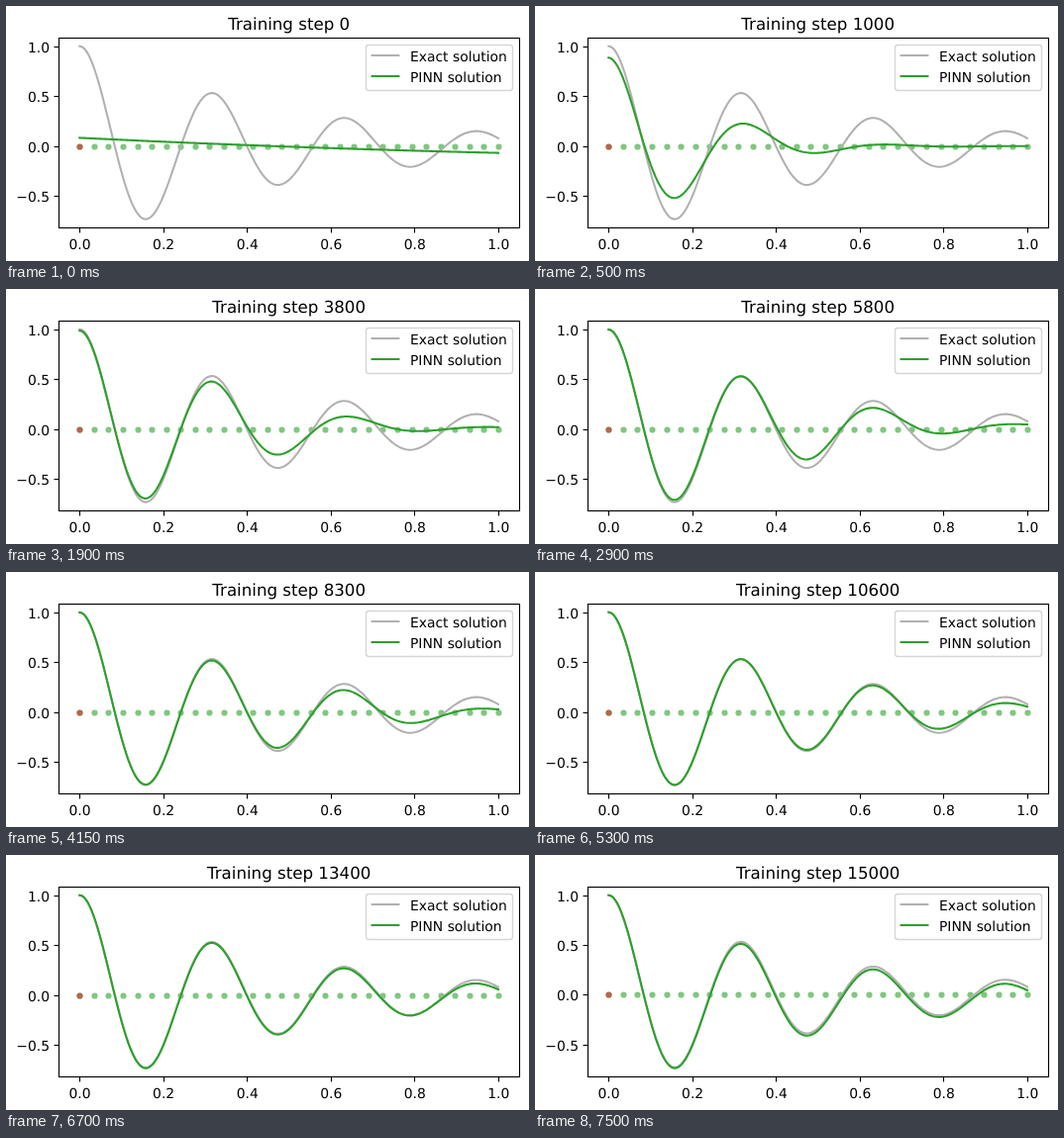
An HTML page for the animation above (7550 ms loop, 528x258 px).

```html
<!DOCTYPE html>
<html lang="en">
<head>
<meta charset="utf-8">
<title>Training curve</title>
<style>
  html, body { margin: 0; width: 100%; height: 100%; overflow: hidden; background: #fff; }
  svg { display: block; width: 528px; height: 258px; }
  text { font: 13.89px "DejaVu Sans", sans-serif; fill: #000; text-rendering: geometricPrecision; }
  #title { font-size: 16.67px; }
  .curve { fill: none; stroke-width: 2.08; stroke-linecap: square; stroke-linejoin: round; }
  .exact { stroke: #b1b1b1; }
  .pinn { stroke: #2ca02c; }
  .axis { fill: none; stroke: #000; stroke-width: 1.11; }
</style>
</head>
<body>
<svg id="stage" viewBox="0 0 528 258">
  <g id="dots"></g>
  <path id="exact" class="curve exact"/>
  <path id="pinn" class="curve pinn"/>
  <g id="ticks"></g>
  <rect class="axis" x="53.5" y="32.5" width="465" height="192"/>
  <text id="title" x="285.7" y="24" text-anchor="middle"></text>
  <rect x="363.5" y="39.5" width="148" height="46" rx="2.8" fill="#fff" fill-opacity=".8" stroke="#ccc" stroke-opacity=".8" stroke-width="1.39"/>
  <path class="curve exact" d="M369.6 50H396.4"/>
  <path class="curve pinn" d="M369.6 71H396.4"/>
  <text x="408" y="56">Exact solution</text>
  <text x="408" y="77">PINN solution</text>
</svg>
<script>
const FRAME_MS = 50, FRAMES = 151, STEPS_PER_FRAME = 100;
const TOP = 31.9, HEIGHT = 192.5, SAMPLES = 240;
const DAMPING = 2, OMEGA = Math.sqrt(396);
const FRONT_SLOPE = 7.2, MAX_LAG = .05;

// How far the learned region reaches along x, and the curve's vertical drift.
const PHASES = [
  { step: 0, front: -1, drift: 0 },
  { step: 800, front: .25, drift: 0 },
  { step: 2100, front: .474, drift: 0 },
  { step: 5800, front: .72, drift: .03 },
  { step: 8300, front: .81, drift: 0 },
  { step: 11800, front: 1.1, drift: .005 },
  { step: 15000, front: 1.25, drift: -.025 }
];

const byId = id => document.getElementById(id);
const mix = (a, b, k) => a + (b - a) * k;
const px = x => 74.3 + 422.7 * x;
const snap = v => Math.round(v) + .5;

function add(parent, tag, attrs, text = "") {
  const node = document.createElementNS("http://www.w3.org/2000/svg", tag);
  for (const name in attrs) node.setAttribute(name, attrs[name]);
  node.textContent = text;
  return parent.appendChild(node);
}

function exact(x) {
  return Math.exp(-DAMPING * x) *
    (Math.cos(OMEGA * x) + DAMPING / OMEGA * Math.sin(OMEGA * x));
}

function phaseAt(step) {
  const next = Math.max(1, PHASES.findIndex(phase => phase.step >= step));
  const from = PHASES[next - 1], to = PHASES[next];
  const k = (step - from.step) / (to.step - from.step);
  return { front: mix(from.front, to.front, k), drift: mix(from.drift, to.drift, k) };
}

// Behind the front the network follows the exact curve; ahead it fades and lags.
function networkAt(step) {
  const { front, drift } = phaseAt(step);
  const untrained = Math.max(0, 1 - step / 300);
  return x => {
    const learned = 1 / (1 + Math.exp(FRONT_SLOPE * (x - front)));
    const lag = MAX_LAG * (1 - learned) ** 2;
    const offset = drift * (1 - Math.exp(-16 * x * x));
    const initial = untrained * (.083 - .2 * x + .05 * x * x);
    return learned * exact(x - lag) + offset + initial;
  };
}

const sample = f => Array.from({ length: SAMPLES + 1 }, (_, i) => f(i / SAMPLES));
const exactValues = sample(exact);

function trace(values, py) {
  return "M" + values.map((v, i) => px(i / SAMPLES).toFixed(2) + " " + py(v).toFixed(2)).join("L");
}

const addDot = (x, fill) =>
  add(byId("dots"), "circle", { cx: snap(px(x)), r: 3.1, fill, "fill-opacity": .6 });
const dots = Array.from({ length: 30 }, (_, i) => addDot(i / 29, "#2ca02c"));
dots.push(addDot(0, "#d62728"));

for (let i = 0; i <= 5; i++) {
  const x = px(i / 5);
  add(byId("ticks"), "path", { class: "axis", d: `M${snap(x)} 224.5v5` });
  add(byId("ticks"), "text", { x: x + .3, y: 246, "text-anchor": "middle" }, (i / 5).toFixed(1));
}

const yTicks = [1, .5, 0, -.5].map(value => ({
  value,
  mark: add(byId("ticks"), "path", { class: "axis" }),
  label: add(byId("ticks"), "text", { x: 44, "text-anchor": "end" },
    value.toFixed(1).replace("-", "\u2212"))
}));

function draw(step) {
  const values = sample(networkAt(step));
  const high = Math.max(...exactValues, ...values);
  const low = Math.min(...exactValues, ...values);
  const range = high - low;
  const py = v => TOP + HEIGHT * (high + .05 * range - v) / (1.1 * range);

  byId("title").textContent = "Training step " + step;
  byId("exact").setAttribute("d", trace(exactValues, py));
  byId("pinn").setAttribute("d", trace(values, py));
  for (const dot of dots) dot.setAttribute("cy", snap(py(0)));
  for (const { value, mark, label } of yTicks) {
    const y = py(value);
    mark.setAttribute("d", `M53.5 ${snap(y)}h-5`);
    label.setAttribute("y", Math.round(y) + 6);
  }
}

let shown = -1;
const start = performance.now();
function tick() {
  const frame = Math.floor((performance.now() - start) / FRAME_MS) % FRAMES;
  if (frame !== shown) draw((shown = frame) * STEPS_PER_FRAME);
  requestAnimationFrame(tick);
}
tick();
</script>
</body>
</html>
```
